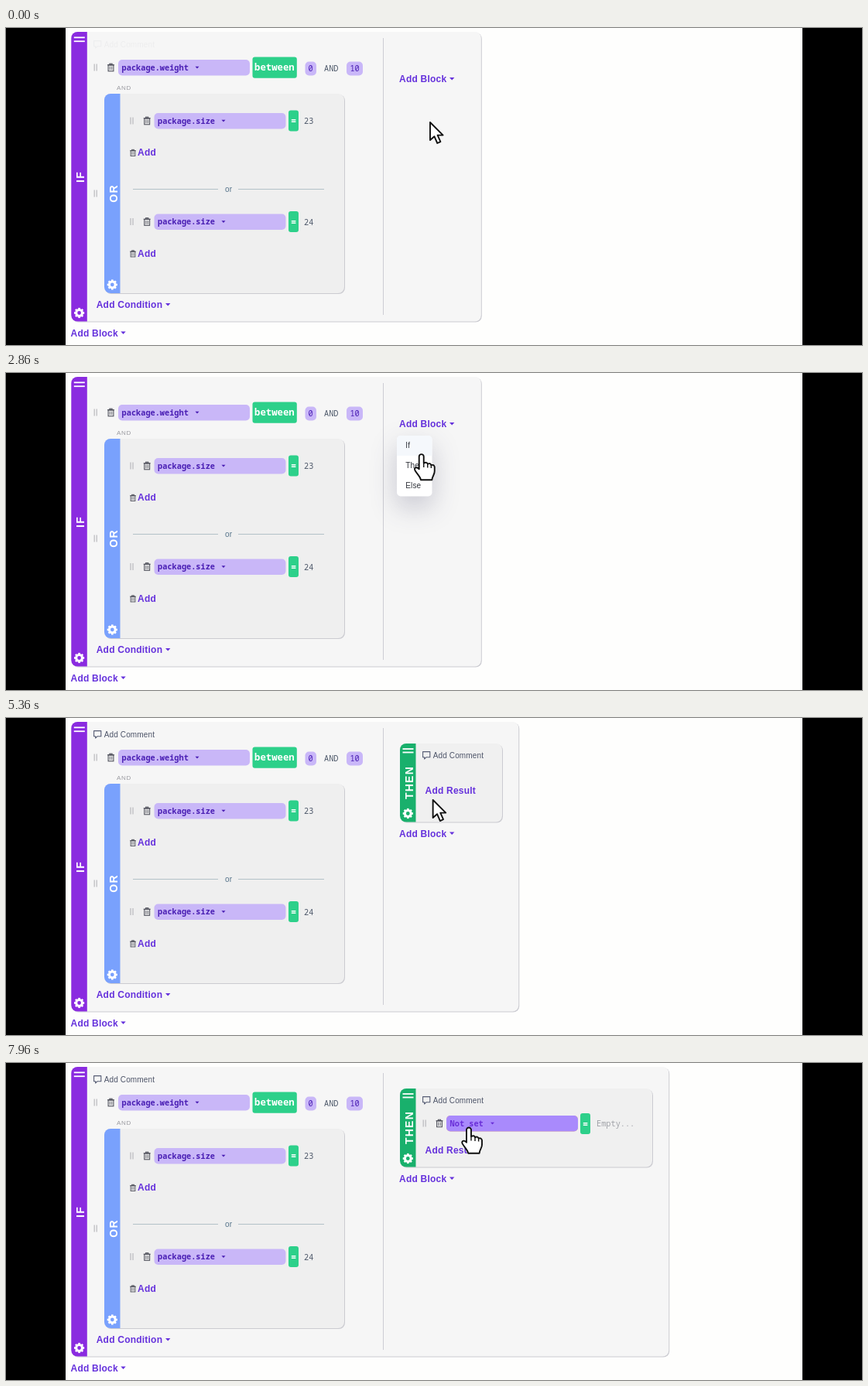
Write an HTML page with a canvas that moves like this. It is 1106 px wide and 410 px high and loops after 8000 ms.

```html
<!DOCTYPE html>
<html lang="en">
<head>
<meta charset="utf-8">
<title>Rule builder</title>
<style>
html, body { margin: 0; width: 100%; height: 100%; overflow: hidden; background: #000; }
canvas { display: block; }
</style>
</head>
<body>
<canvas id="stage" width="1106" height="410"></canvas>
<script>
const c = document.getElementById('stage').getContext('2d');
const SANS = '"Liberation Sans", Arial, sans-serif';
const MONO = '"Noto Sans Mono", "DejaVu Sans Mono", monospace';
const LINK = '#6531dc', LINK_HOVER = '#4a20b2', GREEN = '#2dd08a', LILAC = '#c9b7f8';
const LOOP = 8000;

const ramp = (t, a, b) => Math.min(1, Math.max(0, (t - a) / (b - a)));
const smooth = u => u * u * (3 - 2 * u);
const out = u => 1 - (1 - u) ** 1.7;

function text(str, x, y, font, color, spacing = 0) {
  c.font = font;
  c.fillStyle = color;
  c.letterSpacing = spacing + 'px';
  c.fillText(str, x, y);
}
const mono = (str, x, y, color, weight = 500) => text(str, x, y, `${weight} 10.28px ${MONO}`, color);

function box(x, y, w, h, r, color) {
  c.fillStyle = color;
  c.beginPath();
  c.roundRect(x, y, w, h, r);
  c.fill();
}

function line(x1, y1, x2, y2, color, width = 1) {
  c.strokeStyle = color;
  c.lineWidth = width;
  c.beginPath();
  c.moveTo(x1, y1);
  c.lineTo(x2, y2);
  c.stroke();
}

function faded(alpha, draw) {
  if (alpha <= 0) return;
  c.save();
  c.globalAlpha *= alpha;
  draw();
  c.restore();
}

function caret(x, y, w, color) {
  c.fillStyle = color;
  c.beginPath();
  c.moveTo(x, y);
  c.lineTo(x + w, y);
  c.lineTo(x + w / 2, y + w / 2 + .3);
  c.fill();
}

function link(str, x, y, hover, caretX) {
  const color = hover ? LINK_HOVER : LINK;
  text(str, x, y, `bold 12px ${SANS}`, color, .22);
  if (caretX) caret(caretX, y - 6.4, 6.4, color);
}

function gear(x, y) {
  for (let i = 0; i < 8; i++) {
    const a = i * Math.PI / 4, dx = Math.cos(a), dy = Math.sin(a);
    line(x + dx * 4, y + dy * 4, x + dx * 6.6, y + dy * 6.6, '#fff', 2.6);
  }
  c.lineWidth = 3;
  c.beginPath();
  c.arc(x, y, 3.9, 0, 7);
  c.stroke();
}

// Rounded panel with a coloured bar and a vertical caption on its left
function card(x, y, w, h, fill, barColor, label, labelY, menu) {
  box(x + 1, y + 1, w, h, 8, '#cbcbd1');
  box(x, y, w, h, 8, fill);
  box(x, y, 20.5, h, [8, 0, 0, 8], barColor);
  for (const m of menu) line(x + 3.5, m, x + 17.5, m, '#fff', 1.8);
  c.save();
  c.translate(x + 16.6, labelY);
  c.rotate(-Math.PI / 2);
  c.textAlign = 'center';
  text(label, 0, 0, `bold 14px ${SANS}`, '#fff', 1.2);
  c.restore();
  gear(x + 10.3, y + h - 11);
}

function handle(x, y) {
  line(x, y - 4.5, x, y + 4.5, '#bdbdc1', 1.3);
  line(x + 3, y - 4.5, x + 3, y + 4.5, '#bdbdc1', 1.3);
}

function trash(x, y, s = 1) {
  const color = '#50525c';
  c.save();
  c.translate(x, y);
  c.scale(s, s);
  line(-4.5, -3.2, 4.5, -3.2, color, 1.1);
  c.strokeRect(-1.6, -4.8, 3.2, 1.6);
  c.strokeRect(-3.4, -3.2, 6.8, 8);
  line(-1.2, -1.4, -1.2, 3.2, color, .9);
  line(1.2, -1.4, 1.2, 3.2, color, .9);
  c.restore();
}

function comment(x, y) {
  c.strokeStyle = '#565c74';
  c.lineWidth = 1.1;
  c.lineJoin = 'round';
  c.stroke(new Path2D(`M${x + .6} ${y - 4.4}h9.2v7.2h-5l-2.2 2.2v-2.2h-2z`));
  text('Add Comment', x + 13.8, y + 4, `10px ${SANS}`, '#4d5468', .12);
}

function pill(str, x, y, caretX, fill = LILAC, color = '#4a1fb4') {
  box(x, y - 10, 170, 20.5, 5, fill);
  mono(str, x + 4.6, y + 3.8, color, 600);
  caret(caretX, y - 1.3, 5, color);
}

function equals(x, y) {
  box(x, y - 13.5, 13, 27, 3, GREEN);
  text('=', x + 2.9, y + 4.2, `bold 12px ${MONO}`, '#fff');
}

function sizeRow(y, value) {
  handle(161, y);
  trash(182.2, y);
  pill('package.size', 191.5, y, 278.5);
  equals(365, y);
  mono(value, 385, y + 4, '#4f5a6b');
  trash(164, y + 41.4, .85);
  link('Add', 170, y + 45.2);
}

function weightRow() {
  handle(114.2, 51);
  trash(135.5, 51);
  pill('package.weight', 145, 51, 244.5);
  box(318.5, 37.5, 57.3, 27.3, 3, GREEN);
  text('between', 321, 55.3, `bold 12.3px ${MONO}`, '#fff');
  box(386.5, 43.5, 14.5, 18, 5, LILAC);
  mono('0', 390.6, 56, '#4a1fb4');
  mono('AND', 411, 56, '#4f5a6b');
  box(440, 43.5, 21, 18, 5, LILAC);
  mono('10', 444.4, 56, '#4a1fb4');
}

function orCard() {
  text('AND', 143, 80, `8px ${SANS}`, '#9b9ba1', .7);
  handle(114.2, 214);
  card(127, 85, 310, 258, '#efefef', '#79a1fd', 'OR', 214, []);
  sizeRow(120, '23');
  line(164, 208.5, 274, 208.5, '#b3c1c8');
  line(300, 208.5, 411, 208.5, '#b3c1c8');
  text('or', 283, 212, `10px ${SANS}`, '#55738a', .3);
  sizeRow(250.5, '24');
}

function thenCard(t, tip) {
  const grown = t >= 6700;
  card(509, 33, grown ? 326 : 132, 101.5, '#f0f0f0', '#19b06c', 'THEN', 83.5, [40, 44.5]);
  comment(538, 48);
  faded(grown ? .12 + .88 * ramp(t, 6700, 7000) : 0, () => {
    handle(539.2, 78);
    trash(560, 78);
    pill('Not set', 569, 78, 626, '#ffca6b', '#d98200');
    faded(ramp(t, 7790, 7930), () => pill('Not set', 569, 78, 626, '#a98afc', '#6a2fd8'));
    equals(742, 78.5);
    mono('Empty...', 763, 82, '#a0a2a8');
  });
  link('Add Result', 541.5, grown ? 117 : 98.2, t > 4930 && !grown && tip.y < 104);
}

function menu(top, active, pressed) {
  c.save();
  c.shadowColor = 'rgba(60, 62, 100, .26)';
  c.shadowBlur = 34;
  c.shadowOffsetY = 14;
  box(505, top, 45.5, 78.5, 5, '#fff');
  c.restore();
  ['If', 'Then', 'Else'].forEach((name, i) => {
    const y = top + 26.2 * i;
    if (i === active) box(505, y, 45.5, 26, i ? 0 : [5, 5, 0, 0], pressed ? '#f3f6fa' : '#f5f8fc');
    text(name, 516.3, y + 16, `10px ${SANS}`, '#33363d', .1);
  });
}

// start, end, x, y, easing of x, easing of y
const MOVES = [
  [500, 930, 546, 69.5, smooth, smooth],
  [2460, 3290, 526.5, 123, smooth, u => out(smooth(u))],
  [4930, 5860, 565, 97, out, out],
  [6030, 6060, 566, 96, smooth, smooth],
  [7660, 7960, 598, 83.5, smooth, smooth],
];

function pointer(t) {
  let x = 548, y = 122;
  for (const [a, b, toX, toY, easeX, easeY] of MOVES) {
    const u = ramp(t, a, b);
    x += (toX - x) * easeX(u);
    y += (toY - y) * easeY(u);
  }
  const hand = t < 2460 ? y < 76 : t < 4930 || y < (t < 7660 ? 104 : 90);
  return { x, y, hand };
}

const ARROW = new Path2D('M0 0V23L5.4 18.2L9.3 27L13.4 25.2L9.6 16.6H16.6Z');
const HAND = new Path2D('M-3 3a3 3 0 0 1 6 0V11.5q4-2 5 1q3.6-1.5 4.6 1.5q3.6-1 4.4 2.4' +
  'V22C17 27 14 28 13.6 33.2H-.8C-1.4 29-5 26.5-8.4 20.6C-9.6 17.5-6.6 15.4-3 19.2Z');
const FINGERS = new Path2D('M3 11V17M8 12.5V17.5M12.6 14V18');

function drawPointer({ x, y, hand }) {
  const shape = hand ? HAND : ARROW;
  c.save();
  c.translate(x, y);
  c.lineJoin = 'round';
  c.fillStyle = '#fff';
  c.strokeStyle = '#111';
  c.lineWidth = 1.9;
  c.fill(shape);
  c.stroke(shape);
  c.lineWidth = 1.4;
  if (hand) c.stroke(FINGERS);
  c.restore();
}

function commentAlpha(t) {
  if (t < 2460) return Math.max(.05, ramp(t, 20, 225));
  return t < 3900 ? 1 - ramp(t, 2580, 2780) : ramp(t, 3960, 4200);
}

function draw(t) {
  const tip = pointer(t);
  const added = t >= 3930, shift = added ? 83.5 : 0;
  c.fillStyle = '#000';
  c.fillRect(0, 0, 1106, 410);
  c.fillStyle = '#fefefd';
  c.fillRect(77, 0, 952, 410);

  card(84.3, 5, t >= 6700 ? 772 : added ? 578 : 529.5, 374.5, '#f6f6f6', '#8a2be0', 'IF', 192.5, [12.3, 17.2]);
  faded(commentAlpha(t), () => comment(113, 21));
  weightRow();
  orCard();
  link('Add Condition', 116.7, 362.3, false, 206);
  link('Add Block', 83.5, 399, false, 148.3);
  line(487.5, 13, 487.5, 371, '#cdcdd3');

  faded(ramp(t, 3930, 4230), () => thenCard(t, tip));
  link('Add Block', 508, 70.3 + shift, !added && tip.y < 76, 573);
  const shown = t < 1460 ? 0 : (.6 + .4 * ramp(t, 1460, 1560)) * (1 - ramp(t, 3940, 4110));
  const active = tip.y < 81 ? -1 : tip.y < 107.5 ? 0 : 1;
  faded(shown, () => menu(81 + shift, active, t >= 3760));
  drawPointer(tip);
}

function frame() {
  draw(performance.now() % LOOP);
  requestAnimationFrame(frame);
}
frame();
</script>
</body>
</html>
```
